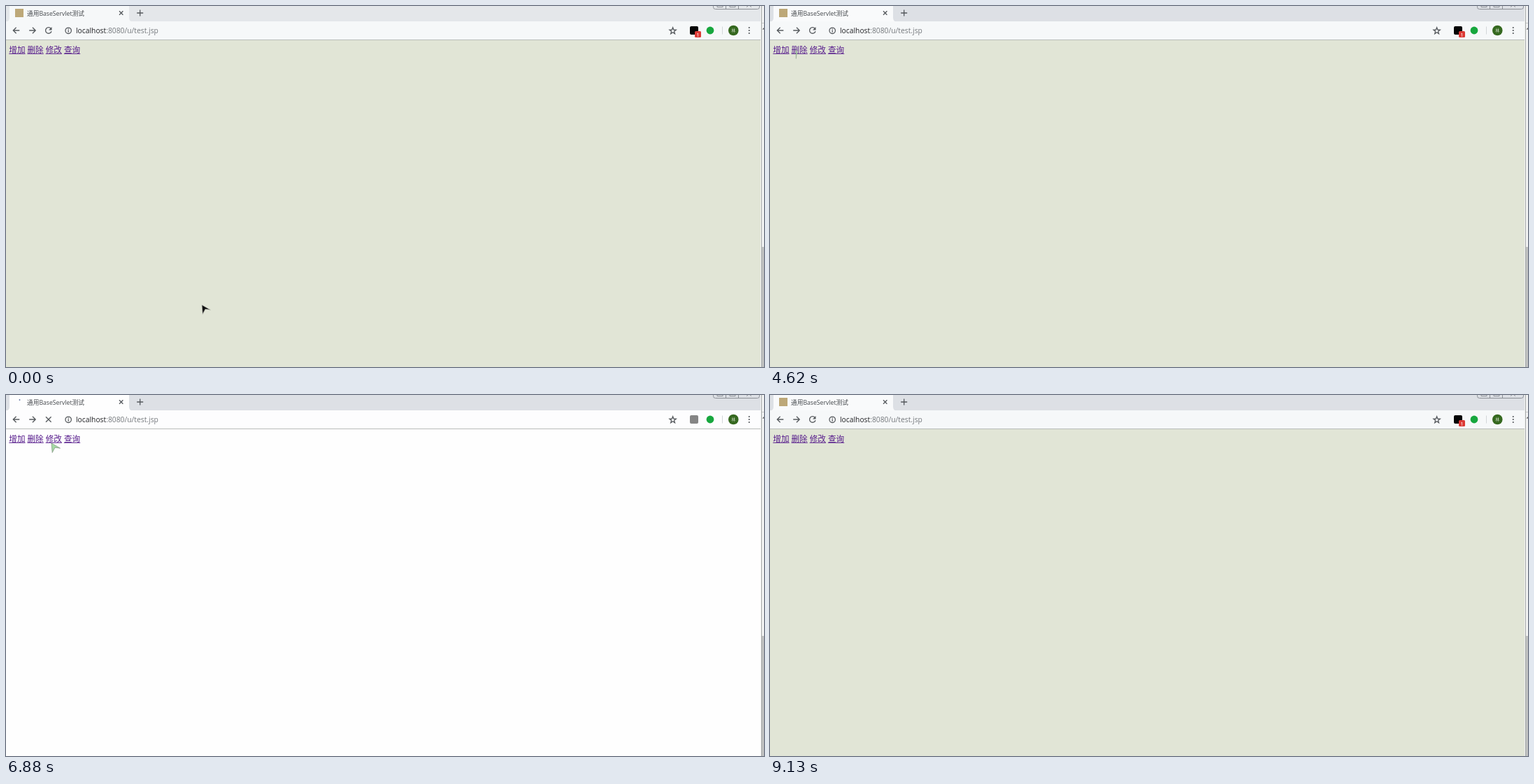
Recreate the animation shown at these times as an HTML page. Size 1084 by 517 pixels, loop 9.97 s.

```html
<!DOCTYPE html>
<html lang="zh-CN">
<head>
<meta charset="utf-8">
<style>
html, body { margin: 0; width: 100%; height: 100%; overflow: hidden; }
svg { display: block; width: 1084px; height: 517px; }
text { font-family: "Open Sans", "Noto Sans CJK SC", "Noto Sans CJK", sans-serif; }
.tab { font-size: 8.7px; fill: #45494d; }
.url { font-size: 10.3px; fill: #202124; }
.url .path { fill: #74787c; }
.page { font-size: 11.6px; font-family: "Noto Sans CJK SC", "Noto Sans CJK", sans-serif; }
.icon { fill: none; stroke: #55595d; stroke-width: 1.3; }
</style>
</head>
<body>
<svg viewBox="0 0 1084 517">
  <defs>
    <linearGradient id="fade" gradientUnits="userSpaceOnUse" x1="144" x2="156">
      <stop stop-color="#45494d"/><stop offset="1" stop-color="#45494d" stop-opacity="0"/>
    </linearGradient>
    <clipPath id="titleClip"><path d="M28 0H156V20H28Z"/></clipPath>
  </defs>

  <rect id="bar" width="1080" height="23"/>
  <path id="tab" d="M0 22.5Q5 22 5 17V0H176V17Q176 22 181 22.5Z"/>
  <rect id="tools" y="22" width="1080" height="26"/>
  <rect id="pill" x="76" y="25" width="891" height="20" rx="10" fill="#f1f3f4"/>
  <rect id="body" y="48" width="1080" height="469"/>
  <path d="M0 48.5H1079" stroke="#b9bcba"/>

  <rect id="fav" x="13" y="4" width="12" height="12" fill="#bda878"/>
  <circle id="spin" cx="19.5" cy="7" r=".9" fill="#5d6fa0"/>
  <text id="title" class="tab" x="30" y="13.5" clip-path="url(#titleClip)"></text>
  <path class="icon" d="M162 7.3l5.4 5.4m0-5.4l-5.4 5.4M187.2 10h9M191.7 5.5v9"/>

  <path class="icon" d="M19.3 35H10.4M14.6 30.7L10.3 35l4.3 4.3"/>
  <path id="forward" class="icon" d="M33.2 35h8.9M37.9 30.7l4.3 4.3-4.3 4.3"/>
  <g id="reload"><path class="icon" d="M64.2 32.2A4.3 4.3 0 1 0 65 36.2"/><path d="M65.5 30v4.5H61Z" fill="#55595d"/></g>
  <path id="stop" class="icon" d="M57 31.2l7.6 7.6m0-7.6L57 38.8"/>
  <circle class="icon" cx="89.2" cy="35.3" r="4.2" stroke-width="1.1"/>
  <path class="icon" d="M89.2 34.6v3M89.2 32.6v1.1"/>
  <text class="url" x="100" y="39">localhost<tspan id="path" class="path"></tspan></text>

  <path id="star" class="icon" stroke-width="1.1"/>
  <rect id="ext" x="978" y="29" width="12" height="12" rx="2"/>
  <g id="badge">
    <rect x="985" y="36" width="9" height="9" rx="1.5" fill="#dc3a36"/>
    <text x="989.5" y="43.5" font-size="8" fill="#fff" text-anchor="middle">1</text>
  </g>
  <circle cx="1007" cy="35" r="5.4" fill="#17a73e"/>
  <path d="M1024.5 29.5v11" stroke="#d3d6d9"/>
  <circle cx="1040.3" cy="35" r="7.3" fill="#35681f"/>
  <text x="1040.3" y="37.3" font-size="5.5" fill="#e4ecdf" text-anchor="middle">林</text>
  <g fill="#55595d"><circle cx="1062.8" cy="31" r="1.1"/><circle cx="1062.8" cy="35" r="1.1"/><circle cx="1062.8" cy="39" r="1.1"/></g>

  <path d="M1011.5 0V1.5Q1011.5 4.5 1014.5 4.5H1074.5Q1077.5 4.5 1077.5 1.5V0M1029.5 0V4M1047.5 0V4M1017 0V1.5H1025V0M1035 0V1.5H1043V0M1059 1.5L1061 0M1066 1.5L1064 0" fill="none" stroke="#8b8f95"/>

  <rect x="1079" width="5" height="517" fill="#f2f3f3"/>
  <rect x="1081" y="345" width="3" height="172" fill="#c0c1c1"/>
  <path d="M1080.5 0V517" stroke="#a5a8a8"/>
  <path d="M1081 24.5H1084" stroke="#c8c8c8"/>
  <path d="M1081.5 33.5L1084 31V33.5Z" fill="#555"/>

  <g id="links" class="page" fill="#551a8b"></g>
  <text id="message" class="page" x="4.3" y="66.5" fill="#111"></text>

  <path id="arrow" d="M0 0L12.5 7.2L5 6.2L1.2 13.5Z" stroke-width=".7"/>
  <g id="ibeam" fill="none">
    <path d="M-3-5.5H-1L0-4.5L1-5.5H3M0-4.5V4.5M-3 5.5H-1L0 4.5L1 5.5H3" stroke="#fff" stroke-width="2.4"/>
    <path d="M-3-5.5H-1L0-4.5L1-5.5H3M0-4.5V4.5M-3 5.5H-1L0 4.5L1 5.5H3" stroke="#222"/>
  </g>
</svg>
<script>
const LOOP = 9970;
const $ = id => document.getElementById(id);
const show = (id, on) => $(id).setAttribute('display', on ? 'inline' : 'none');
const fill = (id, color) => $(id).setAttribute('fill', color);

// Screen updates arrive in bursts: start, end, number of updates
const bursts = [[150, 730, 5], [1000, 1150, 2], [1740, 2020, 3], [2420, 3350, 8], [3470, 3610, 2],
  [4200, 5170, 8], [5300, 6250, 8], [6380, 7290, 8], [7620, 8170, 5], [8450, 9130, 6]];

// time, page, flags: L loading, W unstyled white, G grey extension, P address pill, F forward enabled
const states = [
  [0, 'home', ''], [1000, 'home', 'P'], [1740, 'home', 'LGP'], [2020, 'home', ''],
  [3340, 'home', 'L'], [3470, 'add', 'L'], [3610, 'add', ''],
  [4200, 'add', 'LF'], [4335, 'home', 'LG'], [4470, 'home', ''], [4750, 'home', 'L'],
  [4890, 'delete', 'L'], [5030, 'delete', ''],
  [5300, 'delete', 'LF'], [5430, 'home', 'LGW'], [5570, 'home', ''], [6110, 'home', 'L'],
  [6250, 'update', 'LW'], [6380, 'update', ''],
  [6640, 'update', 'LF'], [6770, 'home', 'LGW'], [6900, 'home', ''],
  [7620, 'home', 'L'], [7755, 'find', 'LW'], [7890, 'find', ''],
  [8450, 'find', 'LF'], [8585, 'home', 'LGW'], [8720, 'home', '']
];
const verbs = { add: '增加', delete: '删除', update: '修改', find: '查询' };

// time, x, y of the pointer
const path = [[0, 280, 428], [150, 280, 428], [440, 190, 215], [585, 156, 95], [730, 256, 37],
  [2290, 256, 37], [2690, 110, 78], [3080, 14, 63], [4200, 14, 63], [4610, 37, 62],
  [5430, 37, 62], [5840, 65, 69], [6770, 65, 69], [7280, 92, 67], [7755, 92, 67],
  [8165, 163, 127], [8450, 163, 127], [8985, 940, 502], [9125, 1000, 540]];

Object.values(verbs).forEach((verb, i) => {
  const x = 4.3 + i * 26.2;
  $('links').innerHTML += `<text x="${x}" y="66.5">${verb}</text><path d="M${x} 68.3h23.3" stroke="#551a8b"/>`;
});
$('star').setAttribute('d', 'M' + Array.from({ length: 10 }, (_, i) => {
  const r = i % 2 ? 2.1 : 4.9, a = i * Math.PI / 5;
  return `${953.6 + r * Math.sin(a)} ${35.7 - r * Math.cos(a)}`;
}).join('L') + 'Z');

function lastUpdate(t) {
  let at = 0;
  for (const [a, b, n] of bursts) {
    if (t < a) break;
    const step = (b - a) / (n - 1);
    at = a + Math.min(n - 1, Math.floor((t - a + 5) / step)) * step;
  }
  return at;
}

function pointer(t) {
  const i = path.findIndex(p => p[0] > t);
  if (i < 0) return path.at(-1).slice(1);
  const [t0, x0, y0] = path[i - 1], [t1, x1, y1] = path[i];
  const k = (t - t0) / (t1 - t0);
  return [x0 + (x1 - x0) * k, y0 + (y1 - y0) * k];
}

function drawPointer(t) {
  const [x, y] = pointer(lastUpdate(t));
  const beam = t >= 725 && t < 2420;
  const green = t >= 3075 && t < 7890;
  const turn = t >= 4610 && t < 4750 ? .22 : 1;
  show('ibeam', beam);
  show('arrow', !beam);
  $(beam ? 'ibeam' : 'arrow').setAttribute('transform', `translate(${x} ${y}) scale(${turn} 1)`);
  fill('arrow', green ? '#a5dba5' : '#111');
  $('arrow').setAttribute('stroke', green ? '#7d8f7d' : '#c4c8bd');
}

function draw(t) {
  const [, page, flags] = states.findLast(s => s[0] <= t);
  const has = f => flags.includes(f);
  const home = page === 'home', active = t >= 1000;
  const white = has('W'), loading = has('L');

  fill('bar', active ? '#dde0e5' : '#e4e7ea');
  fill('tab', has('P') || white ? '#fefefe' : active ? '#f9fafb' : '#f6f8f9');
  fill('tools', has('P') || white ? '#fdfdfe' : '#f6f8f9');
  fill('body', white ? '#fefefe' : '#e1e5d6');
  fill('ext', has('G') ? '#858585' : '#050505');
  show('pill', has('P'));
  show('badge', !has('G'));
  show('fav', !loading && home);
  show('spin', loading && !has('F'));
  show('reload', !loading);
  show('stop', loading);
  $('forward').style.stroke = home || has('F') ? '' : '#c3c6c8';

  const query = '?method=' + page;
  $('title').textContent = home ? '通用BaseServlet测试' : 'localhost:8080/u/actionServlet' + query;
  $('title').style.fill = home ? '' : 'url(#fade)';
  $('path').textContent = home ? ':8080/u/test.jsp' : ':8080/u/actionServlet' + query;
  show('links', home);
  $('message').textContent = home ? '' : `这是${verbs[page]}方法啊`;
  drawPointer(t);
}

function frame() {
  draw(performance.now() % LOOP);
  requestAnimationFrame(frame);
}
frame();
</script>
</body>
</html>
```
